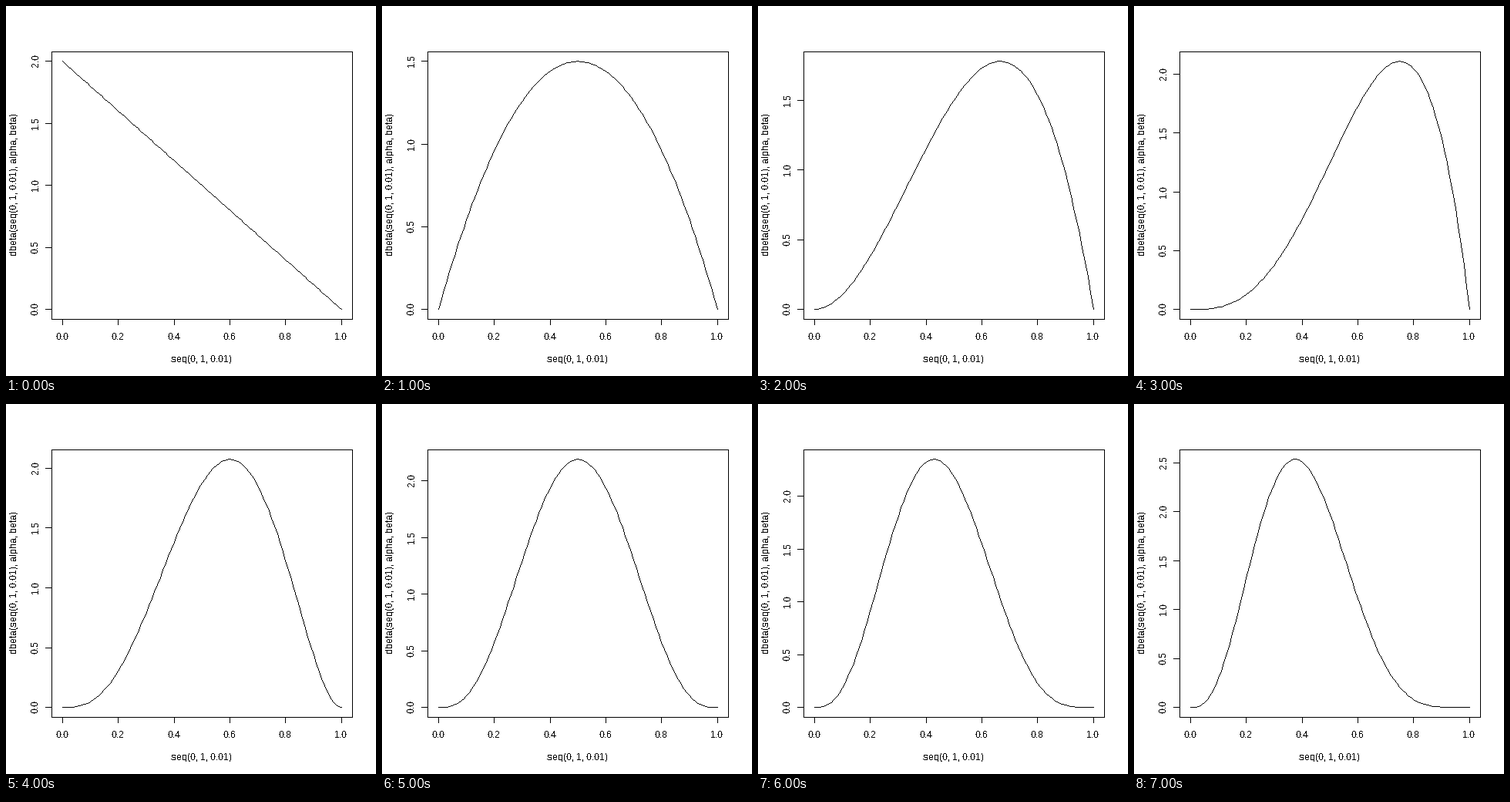
Animation, 480 px wide and 480 px high, one loop 8000 ms. Source, as a matplotlib script:

```python
import numpy as np
import matplotlib.pyplot as plt
from math import factorial
from matplotlib.animation import FuncAnimation
from matplotlib.transforms import IdentityTransform

plt.rcParams["font.family"] = "Liberation Sans"
plt.rcParams["text.hinting"] = "native"
plt.rcParams["text.hinting_factor"] = 1
plt.rcParams["text.antialiased"] = False

SIZE = 480
LEFT, TOP, RIGHT, BOTTOM = 59.04, 59.04, 449.76, 406.56
TICK = 7.2
X_BASE, X_TITLE, Y_BASE, Y_TITLE = 433, 462, 42, 14

# Prior Beta(1, 2), then three successes and four failures
SHAPES = [(1, 2), (2, 2), (3, 2), (4, 2), (4, 3), (4, 4), (4, 5), (4, 6)]
GRID = np.linspace(0, 1, 101)

fig = plt.figure(figsize=(SIZE / 72, SIZE / 72), dpi=72, facecolor="white")


def to_x(v):
    return LEFT + (RIGHT - LEFT) * (v + 0.04) / 1.08


def to_y(v, peak):
    return BOTTOM - (BOTTOM - TOP) * (v / peak + 0.04) / 1.08


def density(a, b):
    scale = factorial(a + b - 1) / (factorial(a - 1) * factorial(b - 1))
    return scale * GRID ** (a - 1) * (1 - GRID) ** (b - 1)


def stroke(img, xs, ys):
    """Draw a one-pixel polyline without antialiasing."""
    pts = np.floor(np.column_stack([xs, ys])).astype(int)
    for p, q in zip(pts[:-1], pts[1:]):
        n = max(np.abs(q - p).max(), 1)
        dx, dy = np.abs(q - p)[:, None] * np.arange(n + 1) / n
        sx, sy = np.sign(q - p)
        # Half steps lag in x and lead in y
        cols = p[0] + sx * np.ceil(dx - 0.5).astype(int)
        rows = p[1] + sy * np.floor(dy + 0.5).astype(int)
        img[rows, cols] = 0


def label(x, y, text, rotation=0):
    return fig.text(x, SIZE - y, text, fontsize=12, color="black",
                    ha="center", va="baseline", rotation=rotation,
                    rotation_mode="anchor", transform=IdentityTransform())


base = np.ones((SIZE, SIZE))
stroke(base, [LEFT, RIGHT, RIGHT, LEFT, LEFT],
       [TOP, TOP, BOTTOM, BOTTOM, TOP])
for v in np.arange(6) / 5:
    stroke(base, [to_x(v)] * 2, [BOTTOM, BOTTOM + TICK])
    label(to_x(v) - 0.5, X_BASE, f"{v:.1f}")

label((LEFT + RIGHT) / 2 - 0.5, X_TITLE, "seq(0, 1, 0.01)")
label(Y_TITLE, (TOP + BOTTOM) / 2 - 1,
      "dbeta(seq(0, 1, 0.01), alpha, beta)", 90)

y_ticks = np.arange(6) / 2
y_labels = [label(Y_BASE, 0, f"{v:.1f}", 90) for v in y_ticks]
plot = fig.figimage(base, cmap="gray", vmin=0, vmax=1, origin="upper")


def draw(i):
    dens = density(*SHAPES[i])
    peak = dens.max()
    img = base.copy()
    stroke(img, to_x(GRID), to_y(dens, peak))
    for v, text in zip(y_ticks, y_labels):
        shown = v <= peak + 1e-9
        text.set_visible(shown)
        if shown:
            y = to_y(v, peak)
            stroke(img, [LEFT - TICK, LEFT], [y, y])
            text.set_y(SIZE - y + 1)
    plot.set_data(img)
    return [plot, *y_labels]


anim = FuncAnimation(fig, draw, frames=len(SHAPES), interval=1000,
                     repeat=True, repeat_delay=0)
plt.show()
```
